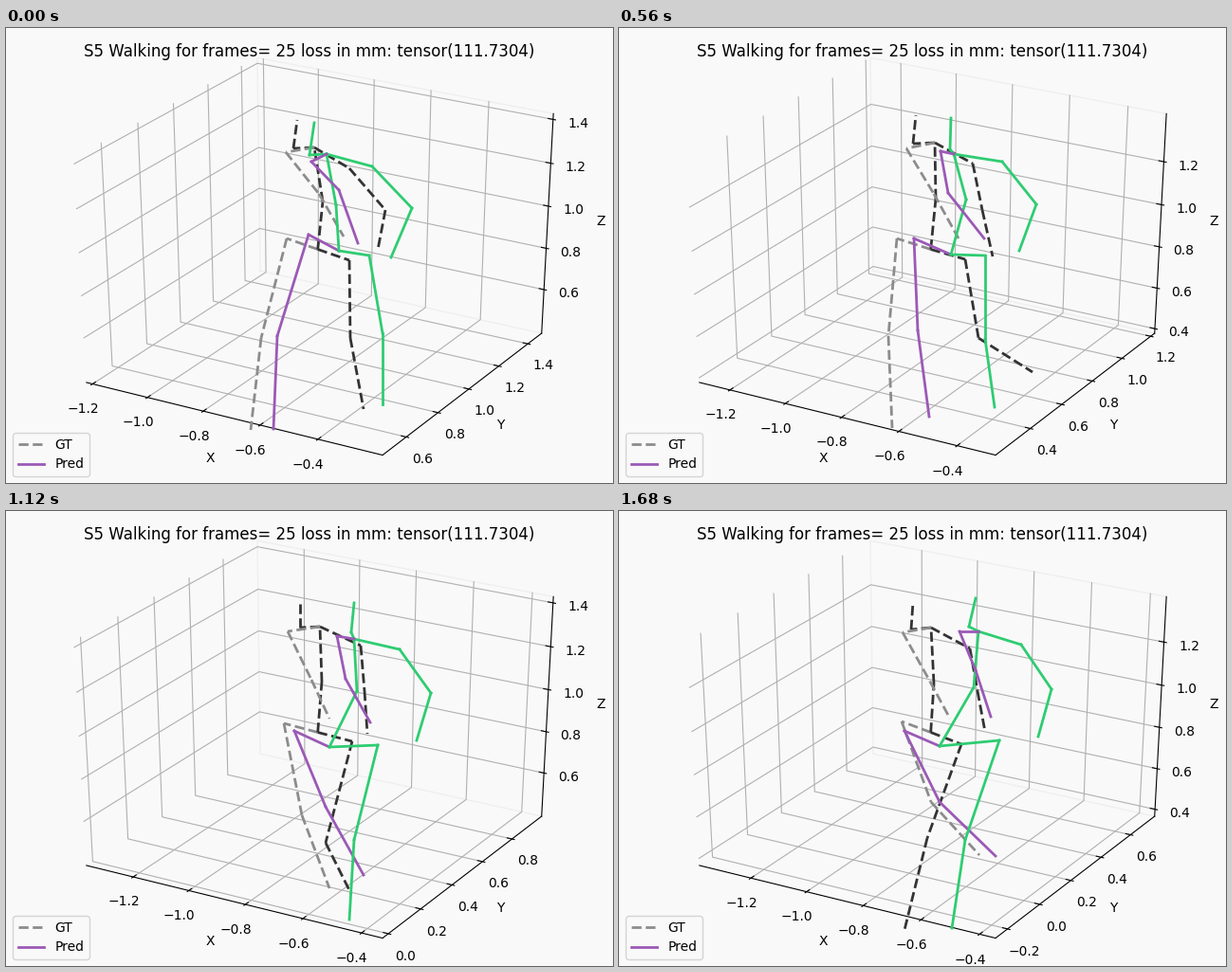
A matplotlib script for the animation above (1.75 s loop, 640x480 px).

```python
import numpy as np
import matplotlib.pyplot as plt
from matplotlib.animation import FuncAnimation
from matplotlib.lines import Line2D

W, H, FRAMES, STEP = 640, 480, 25, 70
PAPER, GRID, EDGE = "#f9f9f9", "#b0b0b0", "#efefef"
DARK, GRAY, GREEN, PURPLE = "#333333", "#8c8c8c", "#2ecc71", "#9b59b6"
KEYS = np.array([0, 3, 8, 12, 16, 19, 24])

# Plot box in unit-cube coordinates around its centre
B = 0.5 + 1 / 48
TICK_OUT, TICK_IN = 0.1 / 12, 0.2 / 12
POINT = 48 / (72 * (6.4 + 4.8)) / 12
TEXT_GAP, LABEL_GAP = 11.5 * POINT, 25 * POINT

AZIM, ELEV, DIST = np.radians(-60), np.radians(30), 10
CA, SA, CE, SE = np.cos(AZIM), np.sin(AZIM), np.cos(ELEV), np.sin(ELEV)
CAMERA = np.array([[-SA, CA, 0],
                   [-SE * CA, -SE * SA, CE],
                   [CE * CA, CE * SA, SE]])


def project(points):
    """Perspective view of cube points, in stage pixels."""
    right, up, near = CAMERA @ np.atleast_2d(points).T
    x = (right / (DIST - near) + 0.095) / 0.185 * W
    y = H - (up / (DIST - near) + 0.095) / 0.185 * H
    return x, y


def track(values):
    """Smooth cubic path through key values, sampled at every frame."""
    v = np.array(values, float)
    slope = np.gradient(v, KEYS)
    t = np.arange(FRAMES)
    i = np.clip(np.searchsorted(KEYS, t, side="right") - 1, 0, len(KEYS) - 2)
    h = KEYS[i + 1] - KEYS[i]
    u = (t - KEYS[i]) / h
    return ((1 + 2 * u) * (1 - u) ** 2 * v[i] + u * (1 - u) ** 2 * h * slope[i]
            + u * u * (3 - 2 * u) * v[i + 1] + u * u * (u - 1) * h * slope[i + 1])


def joint(xs, ys):
    return np.column_stack([track(xs), track(ys)])


# Position of the walker's pelvis, which is the centre of the box
root = np.column_stack([
    track([-.7015, -.726, -.791, -.832, -.850, -.856, -.867]),
    track([.976, .891, .707, .590, .486, .407, .248]),
    track([.905, .891, .898, .903, .907, .898, .886])])

# Ground truth
g_root = joint([328.7] * 7, [233.5] * 7)
g_neck = joint([325, 323, 333, 334, 331, 327, 329],
               [126, 125, 121, 121, 122, 122, 123])
g_right_leg = [
    g_root,
    joint([296, 294, 293, 292, 293, 295, 298], [222, 223, 222, 223, 224, 223, 222]),
    joint([269, 268, 284, 299, 312, 320, 329], [327, 330, 325, 325, 321, 316, 307]),
    joint([258, 249, 288, 318, 341, 355, 380], [424, 432, 422, 409, 398, 389, 363])]
g_left_leg = [
    g_root,
    joint([362, 363, 365, 366, 365, 363, 361], [245, 244, 244, 244, 243, 244, 246]),
    joint([363, 371, 379, 356, 337, 329, 325], [327, 324, 327, 347, 350, 347, 345]),
    joint([377, 397, 436, 419, 364, 317, 301], [402, 391, 363, 355, 404, 445, 442])]
g_spine = [
    g_root,
    joint([334, 333, 334, 335, 333, 329, 332], [183, 183, 180, 182, 180, 180, 182]),
    g_neck,
    joint([303, 301, 310, 313, 310, 307, 308], [127, 127, 122, 122, 123, 124, 125]),
    joint([307, 306, 313, 313, 310, 307, 310], [97, 97, 92, 92, 94, 96, 96])]
g_left_arm = [
    g_neck,
    joint([362, 362, 373, 376, 374, 369, 370], [148, 148, 143, 143, 142, 143, 145]),
    joint([400, 391, 383, 383, 378, 374, 378], [192, 190, 192, 192, 190, 188, 190]),
    joint([392, 388, 394, 390, 381, 379, 386], [234, 233, 241, 241, 235, 233, 233])]
g_right_arm = [
    g_neck,
    joint([295, 295, 303, 303, 297, 293, 299], [131, 131, 127, 128, 127, 128, 128]),
    joint([330, 329, 332, 331, 322, 318, 328], [175, 172, 175, 175, 178, 177, 180]),
    joint([356, 355, 358, 350, 341, 337, 349], [220, 220, 222, 223, 219, 217, 219])]

# Prediction
p_root = joint([351, 348, 350, 353, 341, 337, 338],
               [235, 235, 239, 242, 249, 248, 248])
p_neck = joint([338, 337, 353, 368, 367, 369, 379],
               [133, 132, 133, 132, 135, 130, 127])
p_right_leg = [
    p_root,
    joint([319, 312, 311, 314, 304, 298, 301], [218, 219, 222, 224, 232, 230, 232]),
    joint([286, 289, 315, 334, 337, 337, 338], [325, 324, 319, 312, 312, 308, 307]),
    joint([282, 287, 327, 361, 377, 386, 397], [423, 423, 410, 395, 384, 372, 364])]
p_left_leg = [
    p_root,
    joint([383, 377, 386, 397, 392, 391, 401], [240, 240, 240, 241, 247, 244, 242]),
    joint([397, 388, 386, 383, 367, 362, 365], [322, 318, 328, 335, 347, 347, 347]),
    joint([397, 397, 396, 385, 362, 351, 351], [397, 393, 400, 413, 431, 435, 440])]
p_spine = [
    p_root,
    joint([348, 352, 366, 375, 370, 368, 374], [187, 183, 181, 182, 190, 187, 186]),
    p_neck,
    joint([320, 326, 349, 366, 364, 363, 369], [134, 133, 128, 127, 128, 124, 122]),
    joint([325, 328, 350, 366, 367, 368, 376], [100, 97, 95, 94, 97, 93, 92])]
p_left_arm = [
    p_neck,
    joint([386, 387, 404, 417, 415, 415, 424], [146, 142, 141, 141, 146, 142, 141]),
    joint([428, 427, 440, 452, 448, 448, 456], [190, 187, 186, 186, 192, 188, 188]),
    joint([406, 405, 422, 436, 433, 435, 442], [242, 238, 235, 235, 242, 238, 238])]
p_right_arm = [
    p_neck,
    joint([322, 323, 339, 352, 349, 349, 359], [141, 135, 130, 128, 132, 129, 127]),
    joint([351, 341, 347, 359, 358, 362, 376], [171, 171, 174, 173, 177, 172, 168]),
    joint([371, 372, 385, 391, 384, 382, 392], [227, 224, 222, 220, 223, 221, 217])]

LIMBS = [
    (g_right_leg, GRAY, "--"), (g_left_leg, DARK, "--"), (g_spine, DARK, "--"),
    (g_left_arm, DARK, "--"), (g_right_arm, GRAY, "--"),
    (p_right_leg, PURPLE, "-"), (p_left_leg, GREEN, "-"), (p_spine, GREEN, "-"),
    (p_left_arm, GREEN, "-"), (p_right_arm, PURPLE, "-")]

plt.rcParams["font.family"] = "DejaVu Sans"
fig = plt.figure(figsize=(W / 100, H / 100), dpi=100, facecolor=PAPER)
ax = fig.add_axes([0, 0, 1, 1])
ax.set(xlim=(0, W), ylim=(H, 0))
ax.axis("off")
moving = []


def line3d(points, color, width=0.8, z=1):
    return ax.plot(*project(points), color=color, lw=width, zorder=z)[0]


def at(axis, value, first, second):
    """Point with `value` on one axis and the others filled in order."""
    p = [first, second]
    p.insert(axis, value)
    return p


# Per axis: the corner its scale runs along, and its grid as three-point bends
SCALE = [(-B, -B), (B, -B), (B, B)]
BENDS = [[(-B, -B), (B, -B), (B, B)],
         [(B, -B), (-B, -B), (-B, B)],
         [(-B, -B), (-B, B), (B, B)]]
TICK_AXIS = [1, 0, 0]


def draw_scale(axis, centre):
    a, b = SCALE[axis]
    side = TICK_AXIS[axis]
    for k in range(int(np.ceil((centre - 0.5) * 5)), int(np.floor((centre + 0.5) * 5)) + 1):
        v = k / 5 - centre
        moving.append(line3d([at(axis, v, *c) for c in BENDS[axis]], GRID))
        outer, inner = at(axis, v, a, b), at(axis, v, a, b)
        sign = np.sign(outer[side])
        outer[side] += sign * TICK_OUT
        inner[side] -= sign * TICK_IN
        moving.append(line3d([outer, inner], "black", z=2))
        x, y = project(at(axis, v, a + np.sign(a) * TEXT_GAP, b + np.sign(b) * TEXT_GAP))
        text = f"{k / 5:.1f}".replace("-", "\u2212")
        moving.append(ax.text(x[0], y[0], text, fontsize=10, ha="center", va="top"))


def draw(frame):
    while moving:
        moving.pop().remove()
    for axis in range(3):
        draw_scale(axis, root[frame, axis])
    for limb, color, style in LIMBS:
        for start, end in zip(limb, limb[1:]):
            (x0, y0), (x1, y1) = start[frame], end[frame]
            moving.extend(ax.plot([x0, x1], [y0, y1], style, color=color, lw=2, zorder=3))
    return moving


# Faint outline of the back wall
line3d([(-B, B, -B), (-B, B, B), (B, B, B)], EDGE, 1, 0)
line3d([(-B, B, -B), (B, B, -B)], EDGE, 1, 0)

for axis, name in enumerate("XYZ"):
    a, b = SCALE[axis]
    line3d([at(axis, -B, a, b), at(axis, B, a, b)], "black", z=2)
    x, y = project(at(axis, 0, a + np.sign(a) * LABEL_GAP, b + np.sign(b) * LABEL_GAP))
    ax.text(x[0], y[0], name, fontsize=10, ha="center", va="center")

ax.text(W / 2, 30.1, "S5 Walking for frames= 25 loss in mm: tensor(111.7304)",
        fontsize=12, ha="center", va="baseline")
ax.legend([Line2D([], [], color=GRAY, lw=2, ls="--"), Line2D([], [], color=PURPLE, lw=2)],
          ["GT", "Pred"], loc="lower left", fontsize=10, facecolor=PAPER, edgecolor="0.8")

anim = FuncAnimation(fig, draw, frames=FRAMES, interval=STEP, init_func=lambda: draw(0),
                     repeat=True, blit=False)
plt.show()
```
